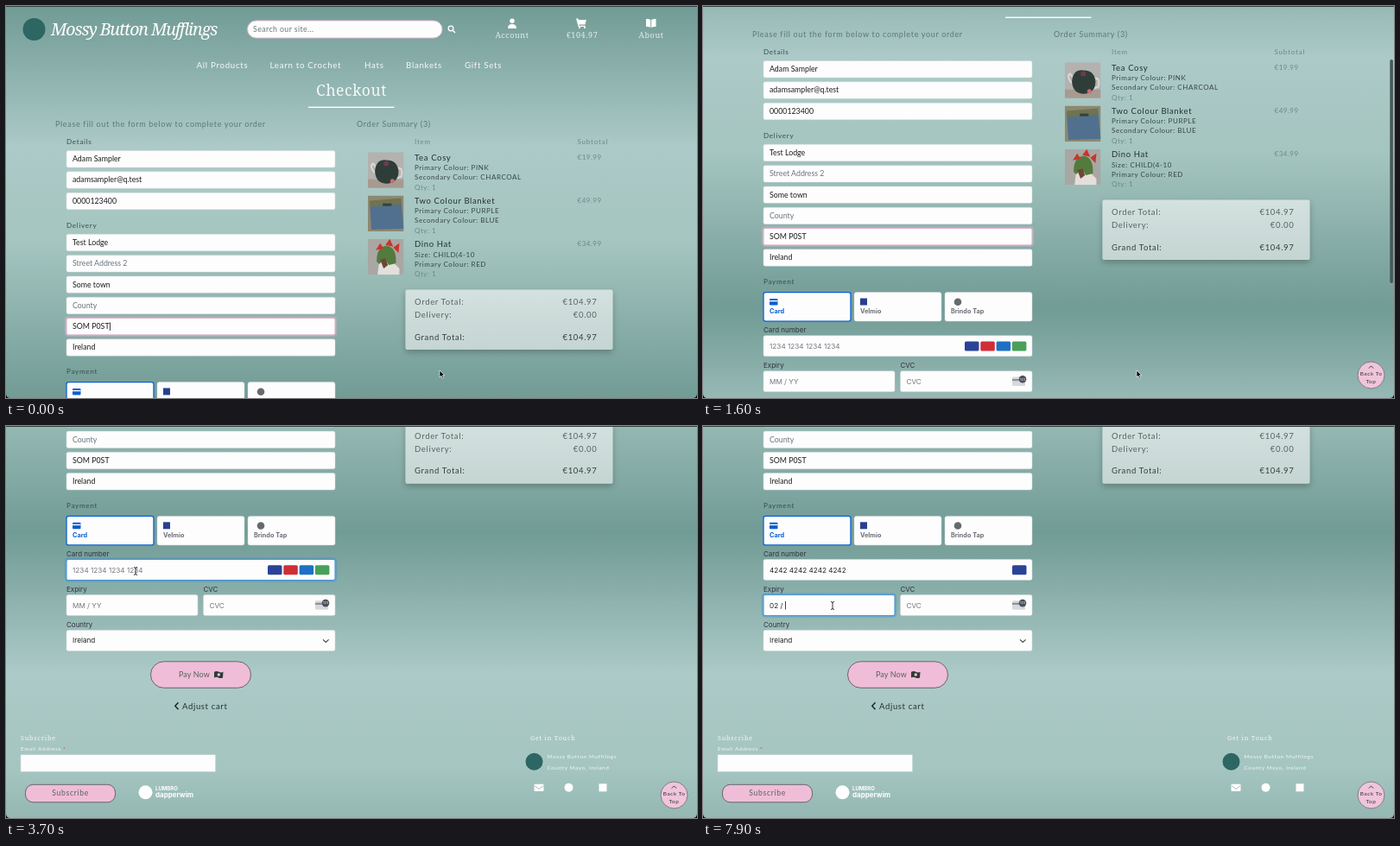
Animation, 800 px wide and 454 px high, one loop 8000 ms. Source, as an HTML page:

```html
<!DOCTYPE html>
<html lang="en">
<head>
<meta charset="utf-8">
<title>Checkout</title>
<style>
  html, body { margin: 0; width: 100%; height: 100%; overflow: hidden; background: #000; }
  svg { display: block; width: 800px; height: 454px; }
  text { font-family: Lato, sans-serif; font-size: 9px; white-space: pre; }
  .brand { font: italic 19.6px "Noto Serif", serif; fill: #fff; letter-spacing: -1.1px; }
  .nav { font-size: 9.7px; fill: #fff; fill-opacity: .92; letter-spacing: .72px; }
  .slab { font: 300 9px "Noto Serif", serif; fill: #fff; fill-opacity: .8; letter-spacing: .6px; }
  .title { font: 300 17.5px "Noto Serif", serif; fill: #fff; fill-opacity: .9; letter-spacing: .6px; }
  .foot { font: 300 7.2px "Noto Serif", serif; fill: #fff; fill-opacity: .85; letter-spacing: .8px; }
  .tiny { font-size: 6.4px; fill: #f2f8f6; letter-spacing: .6px; }
  .lead { fill: #5c7975; letter-spacing: .67px; }
  .label { font-size: 8.2px; fill: #3a4d4a; letter-spacing: .66px; }
  .value { font-size: 8.8px; fill: #1d1d1f; }
  .hint { font-size: 8.8px; fill: #6c757d; }
  .item { font-size: 9.5px; fill: #25312f; letter-spacing: .65px; }
  .spec { font-size: 8px; fill: #374744; letter-spacing: .56px; }
  .dim { font-size: 8px; fill: #6b8985; letter-spacing: .5px; }
  .sum { font-size: 9.5px; fill: #566361; letter-spacing: .68px; }
  .grand { font-size: 9.5px; fill: #353f3d; letter-spacing: .68px; }
  .ui, .ph, .num { font: 8px Inter, sans-serif; fill: #30313d; }
  .ph, .num { font-size: 8.2px; }
  .ph { fill: #757680; }
  .num { fill: #222; }
  .tab { font: 700 7.3px Inter, sans-serif; fill: #6d6e78; }
  .pop { font: 7px Inter, sans-serif; fill: #e6e6e6; }
  .end { text-anchor: end; }
  .mid { text-anchor: middle; }
</style>
</head>
<body>
<svg id="stage" viewBox="0 0 800 454"></svg>
<script>
const PINK = '#efbdd7', BLUE = '#0a5fcf', TEAL = '#2d6663';

const text = (cls, x, y, str, extra = '') =>
  `<text class="${cls}" x="${x}" y="${y}" dy=".34em" ${extra}>${str}</text>`;
const rect = (x, y, w, h, fill, extra = '') =>
  `<rect x="${x}" y="${y}" width="${w}" height="${h}" fill="${fill}" ${extra}/>`;
const circle = (x, y, r, fill, extra = '') =>
  `<circle cx="${x}" cy="${y}" r="${r}" fill="${fill}" ${extra}/>`;
const path = (d, fill, extra = '') => `<path d="${d}" fill="${fill}" ${extra}/>`;
const line = (d, color, width) => path(d, 'none', `stroke="${color}" stroke-width="${width}"`);
const group = (id, body) => `<g id="${id}">${body}</g>`;
const field = (x, y, w, h, r = 2) =>
  rect(x, y, w, h, '#fdfdfd', `rx="${r}" stroke="#ced9da" stroke-width=".5"`);
const ring = (id, x, y, w, h, color) => group(id,
  rect(x - 1, y - 1, w + 2, h + 2, 'none', `rx="3" stroke="${color}" stroke-width="2.4" opacity=".4"`) +
  rect(x, y, w, h, 'none', `rx="2" stroke="${color}" stroke-width=".9"`));

function header() {
  const links = [[220.5, 'All Products'], [305.5, 'Learn to Crochet'], [415, 'Hats'],
    [463, 'Blankets'], [531, 'Gift Sets']];
  return circle(32.5, 27, 13, TEAL) +
    text('brand', 52, 27, 'Mossy Button Mufflings') +
    rect(279.5, 17, 225.5, 20, '#fdfdfd', 'rx="10" stroke="#e5b9d3"') +
    text('hint', 286, 27, 'Search our site...', 'style="letter-spacing:.4px"') +
    circle(515, 26, 2.8, 'none', 'stroke="#fff" stroke-width="1.3"') + line('M517 28l3 3', '#fff', 1.5) +
    circle(586, 17.3, 2.7, '#fff') + path('M581 26q0-5 5-5t5 5z', '#fff') +
    path('M660 14.5h2.4l.5 1.5h9l-1.5 5.5h-7l.3 1.3h7v1.2h-8z', '#fff') +
    circle(664, 25, 1.1, '#fff') + circle(670, 25, 1.1, '#fff') +
    path('M741 15q3-.5 5.2 1v9q-2-1.4-5.2-1zM752.5 15q-3-.5-5.4 1v9q2-1.4 5.4-1z', '#fff') +
    text('slab mid', 586, 33.5, 'Account') + text('slab mid', 667, 33.5, '€104.97') +
    text('slab mid', 747, 33.5, 'About') +
    links.map(([x, s]) => text('nav', x, 68.5, s)).join('') +
    text('title mid', 400, 98, 'Checkout') + rect(350, 116.6, 99.5, 1.4, '#fff');
}

function addressForm() {
  const rows = [[177.3, 'Adam Sampler'], [201.5, 'adamsampler@q.test'], [226, '0000123400'],
    [274, 'Test Lodge'], [298.4, 'Street Address 2', 1], [322.6, 'Some town'],
    [347, 'County', 1], [371.2, 'SOM P0ST'], [395.5, 'Ireland']];
  return text('lead', 57, 137, 'Please fill out the form below to complete your order') +
    text('label', 70, 157, 'Details') + text('label', 70, 254, 'Delivery') +
    rows.map(([y, s, empty]) => field(70, y - 9.7, 311, 19.4) +
      text(empty ? 'hint' : 'value', 77, y, s, y === 371.2 ? 'id="postText"' : '')).join('') +
    ring('postRing', 70, 361.5, 311, 19.4, '#e0aecb');
}

function photos() {
  const teapot = rect(0, 0, 41, 41, '#b3b2af') + rect(0, 31, 41, 10, '#a79a90') +
    path('M8 24Q1 15 6 13l4 5M33 18q8-1 5 10l-6 2', 'none', 'stroke="#d7d8d6" stroke-width="2"') +
    path('M8 22Q9 8 21 9q13 0 14 13 0 13-13 14Q9 36 8 22z', '#2f3d39') +
    circle(21, 13, 3, '#6d3b50') + circle(28, 33, 2.5, '#c96d78');
  const blanket = rect(0, 0, 41, 41, '#8d8871') + path('M2 8L38 6l3 32-37 1z', '#51708f') +
    path('M2 6l36-3v7L3 13z', '#6f7350') + rect(17, 9, 10, 3, '#38403b');
  const hat = rect(0, 0, 41, 41, '#a9a7a3') + path('M11 41l2-16 15 1 8 8v7z', '#e4dfda') +
    path('M10 26Q10 8 22 8q11 2 10 20l-8 2-5-8-6 7z', '#527b3d') +
    path('M9 13l5-8 4 6zM20 7l5-7 4 9zM29 10l7-5-1 11z', '#cb3428') +
    path('M14 24l6-2 3 8-5 4z', '#6b4735');
  return [teapot, blanket, hat].map((p, i) =>
    `<svg x="419" y="${169.3 + i * 50.2}" width="41.5" height="41.5" viewBox="0 0 41 41">${p}</svg>`).join('');
}

function summary() {
  const items = [['Tea Cosy', 'Primary Colour: PINK', 'Secondary Colour: CHARCOAL', '€19.99'],
    ['Two Colour Blanket', 'Primary Colour: PURPLE', 'Secondary Colour: BLUE', '€49.99'],
    ['Dino Hat', 'Size: CHILD(4-10', 'Primary Colour: RED', '€34.99']];
  const totals = [[343.2, 'Order Total:', '€104.97', 'sum'], [358, 'Delivery:', '€0.00', 'sum'],
    [383.3, 'Grand Total:', '€104.97', 'grand']];
  return text('lead', 406, 137, 'Order Summary (3)') +
    text('dim', 473, 157, 'Item', 'style="letter-spacing:.8px"') +
    text('dim', 661.5, 157, 'Subtotal', 'style="letter-spacing:.8px"') + photos() +
    items.map(([name, a, b, price], i) => {
      const y = 175.5 + i * 50.2;
      return text('item', 473, y, name) + text('spec', 473, y + 12, a) + text('spec', 473, y + 23, b) +
        text('dim', 473, y + 34.4, 'Qty: 1') + text('dim', 661.5, y - .5, price);
    }).join('') +
    rect(462.5, 328.5, 240, 69.5, 'url(#panel)', 'rx="2" filter="url(#shadow)"') +
    totals.map(([y, a, b, c]) => text(c, 473, y, a) + text(c + ' end', 684.5, y, b)).join('');
}

function payment() {
  const tabs = [[70, 'Card'], [175, 'Velmio'], [280, 'Brindo Tap']];
  const brands = ['#2a4396', '#d02e35', '#1d70c5', '#48a05a'];
  return text('label', 70, 423.5, 'Payment') +
    tabs.map(([x, s]) => field(x, 435.6, 101, 33.5, 2.5) +
      text('tab', x + 7, 458, s, x === 70 ? `style="fill:${BLUE}"` : '')).join('') +
    rect(70, 435.6, 101, 33.5, 'none', `rx="2.5" stroke="${BLUE}" stroke-width="1.3"`) +
    rect(77, 443, 9.5, 7.5, BLUE, 'rx="1"') + rect(77, 445, 9.5, 1.3, '#fff') +
    rect(182, 442.5, 8, 8, '#27408f') + circle(295, 446.7, 4.3, '#666a70') +
    text('ui', 70, 479.7, 'Card number') + field(70, 485.7, 311, 24) +
    text('ph', 77, 498, '1234 1234 1234 1234', 'id="cardText"') +
    group('brands', brands.map((c, i) => rect(303 + i * 18.3, 492.5, 16.5, 11, c, 'rx="1.5"')).join('')) +
    group('brand', rect(358, 492.5, 16.5, 11, brands[0], 'rx="1.5"')) +
    text('ui', 70, 520.6, 'Expiry') + field(70, 526.8, 152, 24) +
    text('ph', 77, 539, 'MM / YY', 'id="dateText"') +
    text('ui', 228.5, 520.6, 'CVC') + field(228.5, 526.8, 152.5, 24) + text('ph', 235.5, 539, 'CVC') +
    rect(358, 533.5, 15, 10.5, '#d6d9de', 'rx="1.5"') + rect(358, 536, 15, 2.2, '#8e9299') +
    circle(370, 536.3, 4.3, '#4a4f58') + text('ui mid', 370, 536.3, '123', 'style="font-size:3.6px;fill:#fff"') +
    text('ui', 70, 561.3, 'Country') + field(70, 567.7, 311, 24) + text('num', 77, 579.8, 'Ireland') +
    line('M367 578.5l3.3 3.2 3.3-3.2', '#444', 1.1) +
    ring('cardRing', 70, 485.7, 311, 24, '#3d8fd8') + ring('dateRing', 70, 526.8, 152, 24, '#3d8fd8') +
    rect(167.5, 604, 116, 30.5, PINK, 'rx="15.2" stroke="#5f5a60" stroke-width=".9"') +
    text('sum', 200, 619, 'Pay Now', 'style="font-size:9px;letter-spacing:.1px"') +
    path('M241 616q3-1.5 5.5 0t5 0l-.5 6.6q-2.5 1.3-5 0t-5 0z', '#2e3b3a') + circle(246.3, 619.2, 1.7, PINK) +
    line('M199.5 651.5l-3.7 4 3.7 4', '#1c2826', 1.5) + text('item', 204, 655.5, 'Adjust cart');
}

function footer() {
  return text('foot', 17, 692.7, 'Subscribe') +
    text('tiny', 17, 705, 'Email Address <tspan fill="#c8344a">*</tspan>') +
    rect(17, 712, 225.5, 19.5, '#fdfdfd', 'stroke="#c7d3d1" stroke-width=".5"') +
    rect(22.5, 746.5, 104, 20.5, PINK, 'rx="9" stroke="#5f5a60" stroke-width=".9"') +
    text('sum mid', 74.7, 756.7, 'Subscribe', 'style="font-size:8.6px"') +
    circle(161.5, 755.5, 8, '#fff') +
    text('tab', 173, 751, 'LUMBRO', 'style="font-size:6px;fill:#fff"') +
    text('tab', 173, 758.3, 'dapperwim', 'style="font-size:8px;fill:#fff"') +
    text('foot', 607, 692.7, 'Get in Touch') + circle(611.5, 720, 10, TEAL) +
    text('tiny', 626.5, 714, 'Mossy Button Mufflings') + text('tiny', 626.5, 727.2, 'County Mayo, Ireland') +
    rect(611.5, 746, 11, 8.2, '#fff', 'rx="1"') + line('M612 748l5 3.6 5-3.6', '#9abab5', .9) +
    circle(651.5, 750, 5, '#fff') + rect(686.5, 745.5, 9, 9, '#fff');
}

function savedCards() {
  const cards = [['Tavocredit', '0087', '03/26'], ['joint', '4828', '10/25'], ['Tavocredit', '3535', '10/25']];
  return path('M128.5 183.5l4.5-4.5 4.5 4.5z', '#1d1e1e') +
    rect(122.5, 183, 152, 110.5, '#1d1e1e', 'rx="4" stroke="#3a4341" stroke-width=".5" filter="url(#shadow)"') +
    cards.map(([name, digits, date], i) => {
      const y = 194 + i * 27.5;
      return rect(129, y - 1.5, 20.5, 13, '#111', 'rx="1.5" stroke="#bbb" stroke-width=".8"') +
        circle(139.3, y + 5, 4, '#dc3a2a') +
        text('pop', 156, y, `<tspan font-weight="600">${name}</tspan>  <tspan dx="1">· · · · ${digits}</tspan>`, 'style="font-size:6.7px"') +
        text('pop', 156, y + 10.3, date, 'style="font-size:6.5px"');
    }).join('') +
    rect(122.5, 270, 152, .7, '#454747') + circle(134, 282, 3.6, '#c4c6c8') +
    text('pop', 145.5, 282, 'Manage Payment Methods...') + circle(252, 281.7, 3.5, '#4285f4');
}

const defs = `<defs>
  <linearGradient id="sky" gradientUnits="userSpaceOnUse" x1="0" y1="0" x2="0" y2="454" spreadMethod="repeat">
    <stop offset="0" stop-color="#719b95"/><stop offset=".36" stop-color="#accac7"/>
    <stop offset=".6" stop-color="#a5c5c0"/><stop offset="1" stop-color="#719b95"/></linearGradient>
  <linearGradient id="panel" x2="0" y2="1"><stop stop-color="#d3e1df"/><stop offset="1" stop-color="#c5d5d2"/></linearGradient>
  <filter id="shadow" x="-10%" y="-20%" width="120%" height="150%">
    <feDropShadow dx="0" dy="3" stdDeviation="3.5" flood-opacity=".25"/></filter></defs>`;

const toTop = circle(773.5, 427.5, 15.5, '#efc5da', 'stroke="#6c6a70" stroke-width=".8"') +
  line('M770.8 419.6l2.7-2.7 2.7 2.7', '#333', .9) +
  text('tiny mid', 773.7, 426.3, 'Back To', 'style="fill:#333"') +
  text('tiny mid', 773.5, 434.7, 'Top', 'style="fill:#333"');

const pointers =
  group('arrow', path('M0 0v8l1.9-1.7 1.3 2.9 1.4-.6-1.3-2.8 2.5-.1z', '#000', 'stroke="#fff" stroke-width=".7"')) +
  group('hand', path('M-1-4q1.2-1 1.7.4V-.6l3.4.9q1 .3.7 1.8L4 5H-.6L-3.5 1.4q.4-1.2 1.7-.3L-1 1.7z', '#fff', 'stroke="#111" stroke-width=".8"')) +
  group('beam', line('M-2-4.5q2 0 2 1.5v6q0 1.5 2 1.5M2-4.5Q0-4.5 0-3M0 3q0 1.5-2 1.5', '#222', .9));

const stage = document.getElementById('stage');
stage.innerHTML = defs +
  group('page', rect(0, -10, 800, 820, 'url(#sky)') + header() + addressForm() + summary() + payment() + footer() +
    rect(0, 0, .8, 9.5, '#111', 'id="caret"')) +
  group('popup', savedCards()) + group('toTop', toTop) +
  rect(795.3, 0, 3.6, 259, '#455a57', 'id="thumb" rx="1.8"') + pointers +
  rect(0, 0, 800, 1, '#35403f') + path('M0 449v5h5q-5 0-5-5zM800 449v5h-5q5 0 5-5z', '#000');

const el = id => document.getElementById(id);
const show = (id, on) => { el(id).style.display = on ? '' : 'none'; };
const move = (id, x, y) => el(id).setAttribute('transform', `translate(${x} ${y})`);

// Linear interpolation through [time, value] points.
function track(t, points) {
  const i = points.findIndex(p => p[0] > t);
  if (i < 0) return points[points.length - 1][1];
  if (i === 0) return points[0][1];
  const [t0, a] = points[i - 1], [t1, b] = points[i];
  return a + (b - a) * (t - t0) / (t1 - t0);
}

const SCROLL = [[1100, 0], [1200, 12], [1300, 35.4], [1600, 104], [1800, 170], [2100, 256],
  [2300, 301], [2500, 327], [2700, 331.7], [3000, 331.2]];
const MOUSE_X = [[2300, 502], [2700, 293], [3200, 150]];
const MOUSE_Y = [[2300, 422], [2700, 259], [3200, 168], [6900, 168], [7200, 208]];
const CARD_FOCUS = 3600, TYPING = 4800, CARD_DONE = 6400, DATE_TYPING = 7600;

function setInput(id, value, placeholder) {
  el(id).textContent = value || placeholder;
  el(id).setAttribute('class', value ? 'num' : 'ph');
}

function placeCaret(t, cardDigits, date) {
  const [id, y, filled] = t < CARD_FOCUS ? ['postText', 371.2, true]
    : t < CARD_DONE ? ['cardText', 498, cardDigits > 0] : ['dateText', 539, date];
  const width = filled ? el(id).getComputedTextLength() + .4 : 0;
  const typing = (t >= TYPING && t < CARD_DONE) || t >= DATE_TYPING;
  move('caret', 77 + width, y - 4.8);
  show('caret', typing || t % 1000 < 500);
}

function draw(t) {
  const scroll = track(t, SCROLL);
  move('page', 0, -scroll);
  move('thumb', 0, 2 + scroll * .5776);
  show('toTop', scroll > 10);
  show('thumb', scroll > 0 && t < 3300);

  const digits = t < TYPING ? 0 : Math.min(16, 1 + Math.floor((t - TYPING) / 100));
  const spaces = Math.max(0, Math.ceil(digits / 4) - 1);
  const date = t < DATE_TYPING ? '' : t < DATE_TYPING + 200 ? '0' : '02 / ';
  setInput('cardText', '4242 4242 4242 4242'.slice(0, digits + spaces), '1234 1234 1234 1234');
  setInput('dateText', date, 'MM / YY');
  show('brands', digits < 2);
  show('brand', digits > 1);
  show('postRing', t < CARD_FOCUS);
  show('cardRing', t >= CARD_FOCUS && t < CARD_DONE);
  show('dateRing', t >= CARD_DONE);
  show('popup', t >= CARD_FOCUS + 200 && digits < 2);
  placeCaret(t, digits, date);

  const pointer = t < 2500 ? 'arrow' : t < 3100 ? 'hand' : t < TYPING || t >= 6900 ? 'beam' : '';
  for (const id of ['arrow', 'hand', 'beam']) {
    show(id, id === pointer);
    move(id, track(t, MOUSE_X), track(t, MOUSE_Y));
  }
}

// The screen advances ten times a second.
function tick(now) {
  draw(Math.floor(now % 8000 / 100) * 100);
  requestAnimationFrame(tick);
}
draw(0);
requestAnimationFrame(tick);
</script>
</body>
</html>
```
